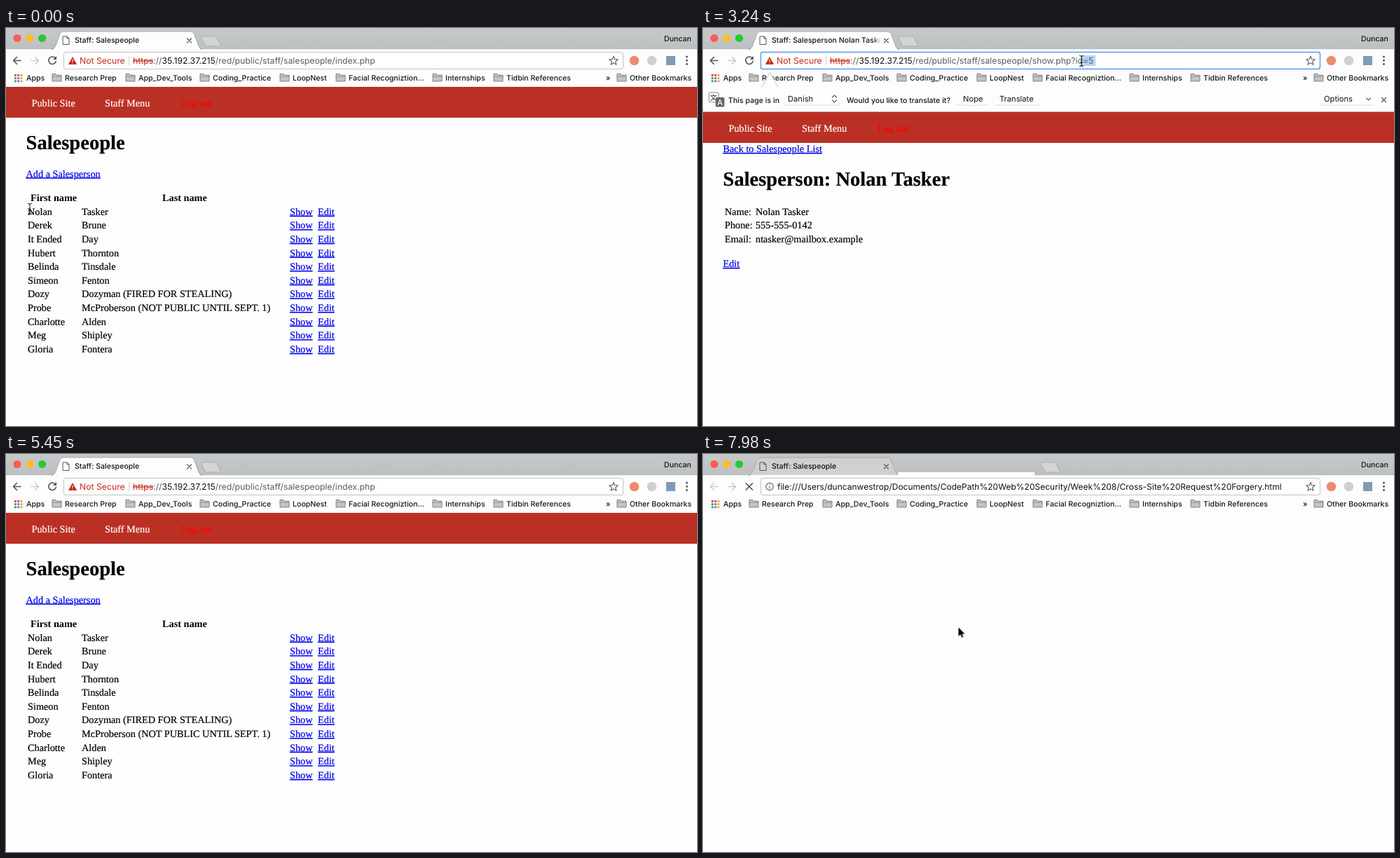
Write an HTML page that moves like this. It is 986x568 px and loops after 8 s.

```html
<!DOCTYPE html>
<html lang="en">
<head>
<meta charset="utf-8">
<title>Staff: Salespeople</title>
<style>
html, body { margin: 0; width: 100%; height: 100%; overflow: hidden; background: #fefefe; }
svg { display: block; width: 986px; height: 568px; }
text { white-space: pre; text-rendering: geometricPrecision; }
.ui { font-family: Inter, Roboto, sans-serif; font-size: 10.6px; font-weight: 500; fill: #161616; }
.url { font-size: 12.23px; font-weight: 400; fill: #5c5c5c; }
.file { font-size: 12.03px; }
.host { fill: #111; }
.warn { fill: #c5281c; }
.side { font-size: 11.3px; font-weight: 400; fill: #2c2c2c; }
.head { font-size: 9.8px; fill: #777; }
.mid { text-anchor: middle; font-weight: 400; fill: #000; }
.web { font-family: "Liberation Serif", "Times New Roman", serif; font-size: 14.28px; fill: #000; }
.web text { stroke: #000; stroke-width: .2px; }
.web .h1 { font-size: 28.56px; font-weight: bold; }
.web .th { font-weight: bold; stroke: none; }
.web .a { fill: #00e; stroke: #00e; text-decoration: underline; }
.web .nav { fill: #fff; stroke: #fff; }
.web .out { fill: #f00; stroke: #f00; }
.line { fill: none; stroke: #666; stroke-width: 1.3; stroke-linecap: round; stroke-linejoin: round; }
</style>
</head>
<body>
<svg id="stage" viewBox="0 0 986 568" xmlns="http://www.w3.org/2000/svg"></svg>
<script>
const LOOP = 8000;
const css = [];

const text = (x, y, s, c = '') => `<text x="${x}" y="${y}" class="${c}">${s}</text>`;
const rect = (x, y, w, h, fill, more = '') =>
  `<rect x="${x}" y="${y}" width="${w}" height="${h}" fill="${fill}" ${more}/>`;
const disc = (x, y, r, fill, more = '') => `<circle cx="${x}" cy="${y}" r="${r}" fill="${fill}" ${more}/>`;
const line = (d, more = '') => `<path class="line" d="${d}" ${more}/>`;
const shape = (d, fill, more = '') => `<path d="${d}" fill="${fill}" ${more}/>`;
const group = (id, body, c = '') => `<g id="${id}" class="${c}">${body}</g>`;
const style = s => `style="${s}"`;

// Hard steps: [ms, declarations]
function steps(id, list) {
  const keys = list.map(([ms, decl]) => `${ms / LOOP * 100}%{${decl}}`).join('');
  css.push(`@keyframes ${id}{${keys}}#${id}{animation:${id} ${LOOP}ms step-end infinite}`);
}
// Visible between each pair of times
const during = (id, ...times) =>
  steps(id, [[0, 'opacity:0'], ...times.map((ms, i) => [ms, `opacity:${(i + 1) % 2}`])]);

// Browser window
const lights = (x, y, r, colors) => colors.map((c, i) => disc(x + i * 17.8, y, r, c)).join('');
const RYG = ['#fc5b57', '#fdbc2e', '#2ac833'];
const folder = (x, y) =>
  shape(`M${x} ${y}h5l1.5 1.8h6.5v8.7h-13z`, '#c4c4c4', 'stroke="#777" stroke-width=".9"') +
  line(`M${x} ${y + 3.7}h13`, style('stroke:#888;stroke-width:.8'));

const bookmarks = [[66, 'Research Prep'], [171, 'App_Dev_Tools'], [277, 'Coding_Practice'], [391, 'LoopNest'],
  [471, 'Facial Recogniztion…'], [609, 'Internships'], [696, 'Tidbin References'], [872, 'Other Bookmarks']];

const appDots = ['#e8453c', '#e8453c', '#f2a63b', '#3aa757', '#4a86e8', '#f2a63b', '#3aa757', '#4a86e8', '#f2a63b']
  .map((c, i) => rect(12 + i % 3 * 4.3, 66 + Math.floor(i / 3) * 4.2, 2.9, 2.9, c)).join('');

const backArrow = color => line('M21 46.5H11M15.5 41.5L10.5 46.5L15.5 51.5', style(`stroke:${color};stroke-width:1.6`));

const frame =
  rect(0, 0, 986, 31, 'url(#strip)') +
  group('idle', rect(0, 0, 986, 31, '#f6f6f6')) +
  lights(16, 14.5, 5.6, RYG) +
  group('idleLights', lights(16, 14.5, 5.6, Array(3).fill('#dadada'))) +
  rect(0, 30, 986, 54, '#fdfdfd') + rect(0, 29.5, 986, 0.7, '#b3b5b6') +
  shape('M65 30.5Q69 30 70.500 26L77 8.500Q78.500 5 82 5H263Q267 5 268.500 8.500L275 26Q276.500 30 280 30.500Z',
    '#fdfdfd', 'id="tab" stroke="#a0a2a3" stroke-width=".9"') +
  rect(67, 30, 211, 1.5, '#fdfdfd') +
  group('plus', shape('M280 12H298Q300 12 301 14L306 24Q306.500 26 304.500 26H287Q285 26 284 24L279 14Q278.300 12 280 12Z',
    '#d3d5d5', 'stroke="#a4a7a8" stroke-width=".8"')) +
  line('M81.500 12H87L90 15V23.500H81.500ZM87 12V15H90', style('stroke:#555;stroke-width:1')) +
  line('M258.500 15L264.500 21M264.500 15L258.500 21', style('stroke:#555;stroke-width:1.1')) +
  text(939, 19, 'Duncan') +
  backArrow('#555') +
  line('M36 46.500H46M41.500 41.500L46.500 46.500L41.500 51.500', style('stroke:#ccc;stroke-width:1.6')) +
  line('M70.500 43.200A5.300 5.300 0 1 0 71.300 47.500', style('stroke:#555;stroke-width:1.6')) +
  shape('M72 40V45H67Z', '#555') +
  rect(82.5, 34.5, 798, 24, '#fff', 'rx="2.500" stroke="#c4c4c4"') +
  group('ring', rect(82.5, 34.5, 798, 24, 'none', 'rx="2.500" stroke="#5b9af2" stroke-width="1.500"')) +
  rect(512, 39, 48, 15, '#b3d4f8', 'id="urlSel"') +
  shape('M95 41L101 52H89Z', '#c5281c') +
  line('M95 45V48M95 50V50.200', style('stroke:#fff;stroke-width:1.1')) +
  text(105, 51, 'Not Secure', 'url warn') + rect(175, 40, 1, 13, '#d0d0d0') +
  shape('M867 40.500L868.700 44.600L873 45L869.800 47.900L870.800 52.200L867 49.900L863.200 52.200L864.200 47.900L861 45L865.300 44.600Z',
    'none', 'stroke="#555" stroke-width="1.100"') +
  disc(896.5, 46.5, 6.8, '#ee8a6e') + disc(921.5, 46.5, 6.8, '#cfcfcf') +
  rect(942, 40, 13, 13, '#7f9bb5') +
  [41, 46.2, 51.4].map(y => disc(971.5, y, 1.5, '#555')).join('') +
  appDots + text(29, 75, 'Apps') +
  bookmarks.map(([x, s]) => folder(x, 65.5) + text(x + 18, 75, s)).join('') + text(856, 74.5, '»') +
  group('idleIcons', rect(4, 36, 74, 22, '#fdfdfd', 'opacity=".5"') + rect(885, 36, 100, 22, '#fdfdfd', 'opacity=".4"'));

const site = 'https://35.192.37.215/red/public/staff/salespeople/';
const address = page => `<text x="181" y="51" class="url"><tspan class="warn" text-decoration="line-through">https</tspan>` +
  `://<tspan class="host">35.192.37.215</tspan>/red/public/staff/salespeople/${page}</text>`;
const status = page => rect(-1, 552.5, 329.5, 17, '#fefefe', 'rx="3" stroke="#b4b4b4"') +
  `<text x="4" y="563.500" style="font-size:9.770px">${site}${page}</text>`;

// Web pages
const navBar = y => rect(0, y, 986, 44, '#bb3024') + text(36.5, y + 27.7, 'Public Site', 'nav') +
  text(141, y + 27.7, 'Staff Menu', 'nav') + text(249, y + 27.7, 'Log out', 'out');

const people = ['Nolan|Tasker', 'Derek|Brune', 'It Ended|Day', 'Hubert|Thornton', 'Belinda|Tinsdale', 'Simeon|Fenton',
  'Dozy|Dozyman (FIRED FOR STEALING)', 'Probe|McProberson (NOT PUBLIC UNTIL SEPT. 1)', 'Charlotte|Alden',
  'Meg|Shipley', 'Gloria|Fontera'];

const listPage = rect(0, 84, 986, 484, '#fefefe') + navBar(84) +
  text(28.5, 173, 'Salespeople', 'h1') + text(28.5, 212.5, 'Add a Salesperson', 'a') +
  text(35, 247, 'First name', 'th') + text(223, 247, 'Last name', 'th') +
  rect(31, 254, 39, 16, '#b3d7fd', 'id="selFirst"') + rect(108, 254, 39, 16, '#b3d7fd', 'id="selLast"') +
  people.map((p, i) => {
    const y = 266.7 + i * 19.63, [first, last] = p.split('|');
    return text(31, y, first) + text(108, y, last) + text(405, y, 'Show', 'a') + text(445, y, 'Edit', 'a');
  }).join('');

const button = (x, w) => rect(x, 93.5, w, 17, '#d2d2d2', 'rx="3.500"') + rect(x, 92.7, w, 17, '#fefefe', 'rx="3.500"');
const barText = (x, y, s) => `<text x="${x}" y="${y}" ${style('font-weight:400;font-size:11.2px')}>${s}</text>`;

const translateBar = shape('M0 84.500H84L95.500 63.500L107 84.500H986V119H0Z', '#fdfdfd') +
  line('M84 84L95.500 63.500L107 84', style('stroke:#c2c2c2;stroke-width:1')) + rect(0, 119, 986, 1, '#bdbdbd') +
  rect(8.5, 92, 14, 14, '#fefefe', 'rx="1.500" stroke="#888"') +
  `<text x="10" y="103" style="font:10px 'Noto Sans CJK SC','Noto Sans CJK',sans-serif">文</text>` +
  rect(18, 99, 12.5, 13.5, '#666', 'rx="1.500"') + `<text x="20.500" y="110" style="fill:#fff">A</text>` +
  text(36, 107, 'This page is in') + button(114, 81) + barText(121, 105, 'Danish') +
  line('M184.500 99L187.500 96L190.500 99M184.500 103L187.500 106L190.500 103') +
  text(205, 107, 'Would you like to translate it?') +
  button(363, 44) + barText(371, 105, 'Nope') + button(416, 64) + barText(423, 105, 'Translate') +
  button(881, 76) + barText(886, 105, 'Options') + line('M946.500 100L949.500 103L952.500 100') +
  line('M968.500 99.500L974.500 105.500M974.500 99.500L968.500 105.500', style('stroke:#555'));

const details = [['Name:', 'Nolan Tasker'], ['Phone:', '555-555-0142'], ['Email:', 'ntasker@mailbox.example']];
const showPage = rect(0, 84, 986, 484, '#fefefe') + navBar(120) +
  text(28.5, 177, 'Back to Salespeople List', 'a') + text(28.5, 225, 'Salesperson: Nolan Tasker', 'h1') +
  details.map(([k, v], i) => text(31, 266.7 + i * 19.6, k) + text(75, 266.7 + i * 19.6, v)).join('') +
  text(28.5, 341, 'Edit', 'a');

const loadPage = rect(0, 84, 986, 484, '#fefefe') + rect(278, 26, 195, 5, '#fdfdfd') +
  rect(5, 36, 72, 22, '#fdfdfd') + backArrow('#ccc') +
  line('M36 46.500H46M41.500 41.500L46.500 46.500L41.500 51.500', style('stroke:#ccc;stroke-width:1.6')) +
  line('M61.500 42L70.500 51M70.500 42L61.500 51', style('stroke:#555;stroke-width:1.7')) +
  rect(85, 37, 772, 19, '#fff') + disc(95, 46.5, 5.2, 'none', 'stroke="#666" stroke-width="1.200"') +
  line('M95 46V49.300M95 43.800V44', style('stroke-width:1.2')) +
  text(106, 51, 'file:///Users/duncanwestrop/Documents/CodePath%20Web%20Security/Week%208/Cross-Site%20Request%20Forgery.html', 'url file host');

// File window
const shadow = [6, 5, 4, 3, 2, 1].map(i =>
  rect(162 - 2.6 * i, 66 - 0.3 * i, 687 + 5.7 * i, 389 + 7.2 * i, '#000', `rx="${5 + 3.3 * i}" opacity=".06"`)).join('');
const tool = (x, w) => rect(x, 88.5, w, 20, '#d0d0d0', 'rx="3"') + rect(x, 88, w, 19.5, '#fcfcfc', 'rx="3"');
const cells = (x, y, n, size, gap, color) => Array.from({ length: n * 2 }, (_, i) =>
  rect(x + i % n * gap, y + Math.floor(i / n) * gap, size, size, color)).join('');
const caret = x => line(`M${x} 96.500l2.700 3l2.700-3`);

const toolbar = shape('M162 115V71Q162 66 167 66H844Q849 66 849 71V115Z', 'url(#bar)') + rect(162, 114.3, 687, 0.8, '#b5b5b5') +
  lights(174.2, 75.8, 5.4, RYG) +
  shape('M475 71H480L481.500 72.500H488.500V81.500H475Z', '#68c2ef') + `<text x="492.500" y="80" style="font-size:11.200px;font-weight:400">Week 8</text>` +
  tool(168, 46) + rect(190.8, 88, 0.8, 20, '#d0d0d0') + line('M181 94L177.500 98L181 102') + line('M201.500 94L205 98L201.500 102', style('stroke:#bbb')) +
  tool(300, 99) + shape('M303 88H326.500V108H303Q300 108 300 105V91Q300 88 303 88Z', '#696969') + cells(309, 94, 2, 3.2, 5, '#fff') +
  line('M332.500 94H344M332.500 97H344M332.500 100H344M332.500 103H344', style('stroke-width:1')) +
  line('M356 94H369V103H356ZM360.300 94V103M364.700 94V103', style('stroke-width:1.1')) +
  line('M383 94H391V103H383ZM380 94V103M394 94V103', style('stroke-width:1.2')) +
  rect(350, 88, 0.8, 20, '#d0d0d0') + rect(374.5, 88, 0.8, 20, '#d0d0d0') +
  tool(407, 35) + cells(413, 94, 3, 3.5, 4.8, '#777') + caret(431) +
  tool(452, 31) + disc(460.5, 98, 3.6, 'none', 'stroke="#666" stroke-width="2.600"') +
  disc(460.5, 98, 5.3, 'none', 'stroke="#666" stroke-width="1.600" stroke-dasharray="2 2.160"') + caret(472) +
  tool(489, 35) + line('M504 96.500H502.500V103.500H511.500V96.500H510M507 100V92M504.500 94.300L507 92L509.500 94.300', style('stroke-width:1.1')) +
  tool(530, 35) + line('M543.500 94.500H554.500V101.500H543.500L540.500 98Z', style('stroke-width:1.2')) +
  tool(636, 206) + disc(708.5, 97.3, 3.5, 'none', 'stroke="#777" stroke-width="1.200"') + line('M711 100L714 103', style('stroke:#777')) +
  `<text x="719.500" y="102.500" style="font-size:11.300px;font-weight:400;fill:#777">Search</text>`;

const cloud = 'M-4 4.500H4.500A3 3 0 0 0 5 -1A4 4 0 0 0 -2.500 -3A3 3 0 0 0 -5 -.500A2.600 2.600 0 0 0 -4 4.500Z';
const sidebar = [
  ['Plover Drive', cloud],
  ['Documents', 'M-3 -6H3L6 -3V4H-3ZM3 -6V-3H6M-3 -3.500H-6V6.500H2.500V4'],
  ['FarToss', null],
  ['All My Files', 'M-5 -6H5V0H-5ZM-6.500 0H6.500V6H-6.500ZM-3 -3H3M-3 3H3'],
  ['Plover Drive', cloud],
  ['Applications', 'M-5.500 6L0 -6L5.500 6M-7 2H7'],
  ['Desktop', 'M-6.500 -5H6.500V5H-6.500ZM-6.500 -2.500H6.500'],
  ['Downloads', 'M-6 0A6 6 0 1 0 6 0A6 6 0 1 0 -6 0M0 -3.500V3.500M-3 .500L0 3.500L3 .500'],
  ['Movies', 'M-6 -6.500H6V6.500H-6ZM-3 -6.500V6.500M3 -6.500V6.500M-3 0H3'],
  ['Music', 'M-2.500 4.500V-5L5 -6.500V3M-2.500 -2.500L5 -4M-5 4.500H-3M2.500 3H4.500'],
  ['duncanwestrop', 'M-7 0L0 -6.500L7 0M-5 -1V6H5V-1M-1.500 6V2H1.500V6'],
  ['Pictures', 'M-7 -3.500H-3L-2 -5H2L3 -3.500H7V5H-7ZM-2.800 .800A2.800 2.800 0 1 0 2.800 .800A2.800 2.800 0 1 0 -2.800 .800']
].map(([s, d], i) => {
  const y = 148 + i * 23.2;
  return (d ? line(d, `transform="translate(185.500 ${y})" style="stroke-width:1.400"`) : disc(185.5, y, 6.5, '#777')) +
    text(199, y + 4.2, s, 'side');
}).join('');

const paper = (x, y, kind) =>
  shape(`M${x} ${y}h26l14 14v41h-40z`, '#fff', 'stroke="#c8c8c8" stroke-width=".900"') +
  shape(`M${x + 26} ${y}v14h14z`, '#eee', 'stroke="#c4c4c4" stroke-width=".800"') +
  `<text x="${x + 20}" y="${y + 50.5}" class="mid" style="font-size:8px;fill:#888">${kind}</text>`;
const label = (x, y, a, b, c = 'mid') => text(x, y, a, c) + text(x, y + 14.3, b, c);
const thumb = (x, y, color) => rect(x - 1, y - 0.5, 56, 35, '#aaa', 'rx="1" opacity=".6"') + rect(x, y, 54, 32.5, '#fdfdfd') +
  rect(x + 2, y + 2, 50, 1.5, '#ddd') + rect(x + 2, y + 5, 50, 2.8, color);
const speck = (x, y, n, c) => Array.from({ length: n }, (_, i) => rect(x, y + i * 3, 9 - i % 3 * 2, 1, c)).join('');
const pick = (x, w1, w2, a, b) => rect(x - w1 / 2, 284.5, w1, 16, '#0b63d9', 'rx="3"') +
  rect(x - w2 / 2, 299, w2, 15, '#0b63d9', 'rx="3"') +
  label(x, 296.5, a, b, 'mid').replaceAll('<text', '<text style="fill:#fff"');

const html = ['Cross-Site', 'Request…ery.html'], gif = ['red_Cross-', 'Site_Re…orgery.gif'];
const files =
  paper(329, 123.5, 'MD') + speck(335, 129, 13, '#e4e4e4') + text(349, 196, 'README.md', 'mid') +
  thumb(421, 134, '#3b4ba0') + rect(448, 137, 25, 6, '#2c2f3a') + speck(424, 145, 6, '#3f7be0') + speck(450, 146, 3, '#ccc') +
  label(447.5, 196, 'blue_Session_Hija', 'cking.gif') +
  thumb(519, 134, '#3b4ba0') + speck(523, 146, 3, '#ccc') + label(545.5, 196, 'blue_SQL_Injectio', 'n.gif') +
  thumb(617.5, 134, '#2f9446') + speck(621, 146, 3, '#ccc') + label(643.5, 196, 'green_User_Enum', 'eration.gif') +
  thumb(715.5, 134, '#2f9446') + speck(719, 146, 5, '#ccc') + label(741.5, 196, 'green_Stored_XS', 'S.gif') +
  group('boxHtml', rect(317, 219, 65, 63, '#dcdcdc', 'rx="3"')) +
  group('boxGif', rect(514, 219, 65, 63, '#dcdcdc', 'rx="3"')) +
  paper(329.5, 223.5, 'HTML') + label(349, 296.5, ...html) +
  thumb(421, 233.5, '#bb3024') + speck(424, 245, 6, '#ccc') + speck(443, 248, 4, '#b9b9ef') +
  label(447.5, 296.5, 'red_Insecure_Dire', 'ct_Obje…rence.gif') +
  rect(518.5, 233.5, 56, 34.5, '#aaa', 'rx="1"') + rect(519, 233.5, 55, 33.5, '#fff') +
  rect(521.3, 235.8, 50.4, 28.9, '#000') + label(545.5, 296.5, ...gif) +
  group('pickHtml', pick(349, 61, 96, ...html)) + group('pickGif', pick(545.5, 61, 97, ...gif));

const finder = shadow + rect(162, 66, 687, 389, '#fefefe', 'rx="5"') +
  `<g clip-path="url(#win)">${rect(162, 115, 135, 340, 'url(#pane)')}${rect(296.4, 115, 0.8, 340, '#d2d2d2')}` +
  text(170, 132, 'Favorites', 'head') + sidebar + text(169.5, 435, 'Devices', 'head') +
  line('M179.500 447H192.500V458H179.500Z') + text(199, 456, 'Duncan’s De…', 'side') + '</g>' + toolbar + files;

const pointers =
  group('arrow', shape('M0 0V12.500L2.900 9.900L4.900 14.400L6.900 13.500L5 9.200H9Z', '#000', 'stroke="#fff" stroke-width="1" paint-order="stroke"')) +
  group('beam', line('M-2.500 -7.500Q0 -7.500 0 -5.500V5.500Q0 7.500 -2.500 7.500M2.500 -7.500Q0 -7.500 0 -5.500M0 5.500Q0 7.500 2.500 7.500M-1.500 2H1.500',
    style('stroke:#222;stroke-width:1.1'))) +
  group('hand', shape('M-3 1V-6Q-3 -7.500 -1.800 -7.500T-.600 -6V-2Q1.500 -2.800 1.700 -1.400Q3.400 -2 3.700 -.600Q5.600 -1 5.600 .800V4L4.200 8H-2.500L-6.300 2.500Q-6.800 .500 -5 .500Z',
    '#fff', 'stroke="#000" stroke-width="1.100" stroke-linejoin="round"') + line('M-.600 -2V1.500M1.700 -1.400V1.500M3.700 -.600V1.500', style('stroke:#000;stroke-width:.8')));

const stops = (id, ...list) => `<linearGradient id="${id}" x2="0" y2="1">${
  list.map(([o, c]) => `<stop offset="${o}" stop-color="${c}"/>`).join('')}</linearGradient>`;

document.getElementById('stage').innerHTML = `<defs>
  ${stops('strip', [0, '#c6c9ca'], [1, '#bcc0c1'])}${stops('bar', [0, '#eaeaea'], [1, '#d5d5d5'])}
  ${stops('pane', [0, '#f1e7e7'], [0.5, '#efebeb'], [1, '#ececec'])}
  <linearGradient id="fade"><stop stop-color="#fdfdfd" stop-opacity="0"/><stop offset="1" stop-color="#fdfdfd"/></linearGradient>
  <clipPath id="win">${rect(162, 66, 687, 389, '#000', 'rx="5"')}</clipPath>
  <clipPath id="tabClip">${rect(98, 6, 156, 24, '#000')}</clipPath></defs>` +
  `<g class="ui">${frame}` +
  group('listTitle', text(98, 21, 'Staff: Salespeople')) +
  group('listUrl', address('index.php')) +
  group('showUi', `<g clip-path="url(#tabClip)">${text(98, 21, 'Staff: Salesperson Nolan Tasker')}</g>` +
    rect(243, 8, 11, 20, 'url(#fade)') + address('show.php?id=5')) + '</g>' +
  group('listPage', listPage, 'web') + group('showPage', showPage, 'web') +
  group('translate', translateBar, 'ui') +
  group('showStatus', status('show.php?id=5'), 'ui') + group('listStatus', status('index.php'), 'ui') +
  group('finder', finder, 'ui') + group('load', loadPage, 'ui') + group('pointer', pointers);

const OPEN = 2210, BACK = 5010, FILES = 6190, CHOOSE = 7830, LOAD = 7980;
during('listTitle', 0, OPEN, BACK);
for (const id of ['listUrl', 'listPage']) during(id, 0, OPEN, BACK, LOAD);
for (const id of ['showUi', 'showPage', 'translate']) during(id, OPEN, BACK);
for (const id of ['idle', 'idleLights', 'idleIcons', 'finder']) during(id, FILES, LOAD);
for (const id of ['boxGif', 'pickGif']) during(id, FILES, CHOOSE);
for (const id of ['boxHtml', 'pickHtml']) during(id, CHOOSE, LOAD);
during('load', LOAD);
during('showStatus', 1920, 2360);
during('listStatus', 4720, 5300);
during('ring', 2950, BACK);
steps('tab', [[0, 'fill:#fdfdfd'], [LOAD, 'fill:#cfd1d1']]);
steps('plus', [[0, 'transform:none'], [LOAD, 'transform:translateX(203px)']]);

const widths = list => list.map(([ms, w]) => [ms, `width:${w}px`]);
steps('selFirst', widths([[0, 0], [290, 14], [440, 31], [590, 39], [OPEN, 0]]));
steps('selLast', widths([[0, 0], [730, 7], [880, 32], [1030, 39], [OPEN, 0]]));
steps('urlSel', [[0, 560], [3090, 553], [3240, 540], [3390, 526], [3540, 512], [BACK, 560]]
  .map(([ms, x]) => [ms, `x:${x}px;width:${560 - x}px`]));

// Pointer: time, kind, x, y
const path = [
  [0, 'beam', 34, 258], [140, 'beam', 33, 262], [290, 'beam', 45, 263], [440, 'beam', 62, 263], [590, 'beam', 87, 264],
  [730, 'beam', 115, 264], [880, 'beam', 140, 265], [1030, 'beam', 163, 266],
  [1330, 'arrow', 185, 266], [1480, 'arrow', 255, 268], [1620, 'arrow', 330, 269], [1770, 'arrow', 390, 268],
  [1920, 'hand', 414, 273], [2070, 'hand', 412, 268], [2210, 'arrow', 373.5, 147.5], [2360, 'arrow', 400, 112],
  [2500, 'arrow', 470, 75], [2650, 'beam', 540, 52], [2800, 'beam', 563, 47], [3090, 'beam', 553, 47],
  [3240, 'beam', 540, 47], [3390, 'beam', 526, 47], [3540, 'beam', 512, 46], [3830, 'arrow', 511, 46],
  [4130, 'arrow', 440, 70], [4280, 'arrow', 280, 118], [4420, 'arrow', 120, 160], [4570, 'hand', 48.5, 179],
  [5010, 'beam', 48, 175], [5300, 'arrow', 14, 190], [5450, '', 0, 190],
  [6490, 'arrow', 511, 346], [6790, 'arrow', 455, 335], [6940, 'arrow', 380, 310], [7090, 'arrow', 308, 285],
  [7240, 'arrow', 332, 262], [7380, 'arrow', 364.5, 247.5]
];
steps('pointer', path.map(([ms, , x, y]) => [ms, `transform:translate(${x}px,${y}px)`]));
for (const kind of ['arrow', 'beam', 'hand'])
  steps(kind, path.map(([ms, k]) => [ms, `opacity:${k === kind ? 1 : 0}`]));

document.head.appendChild(document.createElement('style')).textContent = css.join('\n');
</script>
</body>
</html>
```
